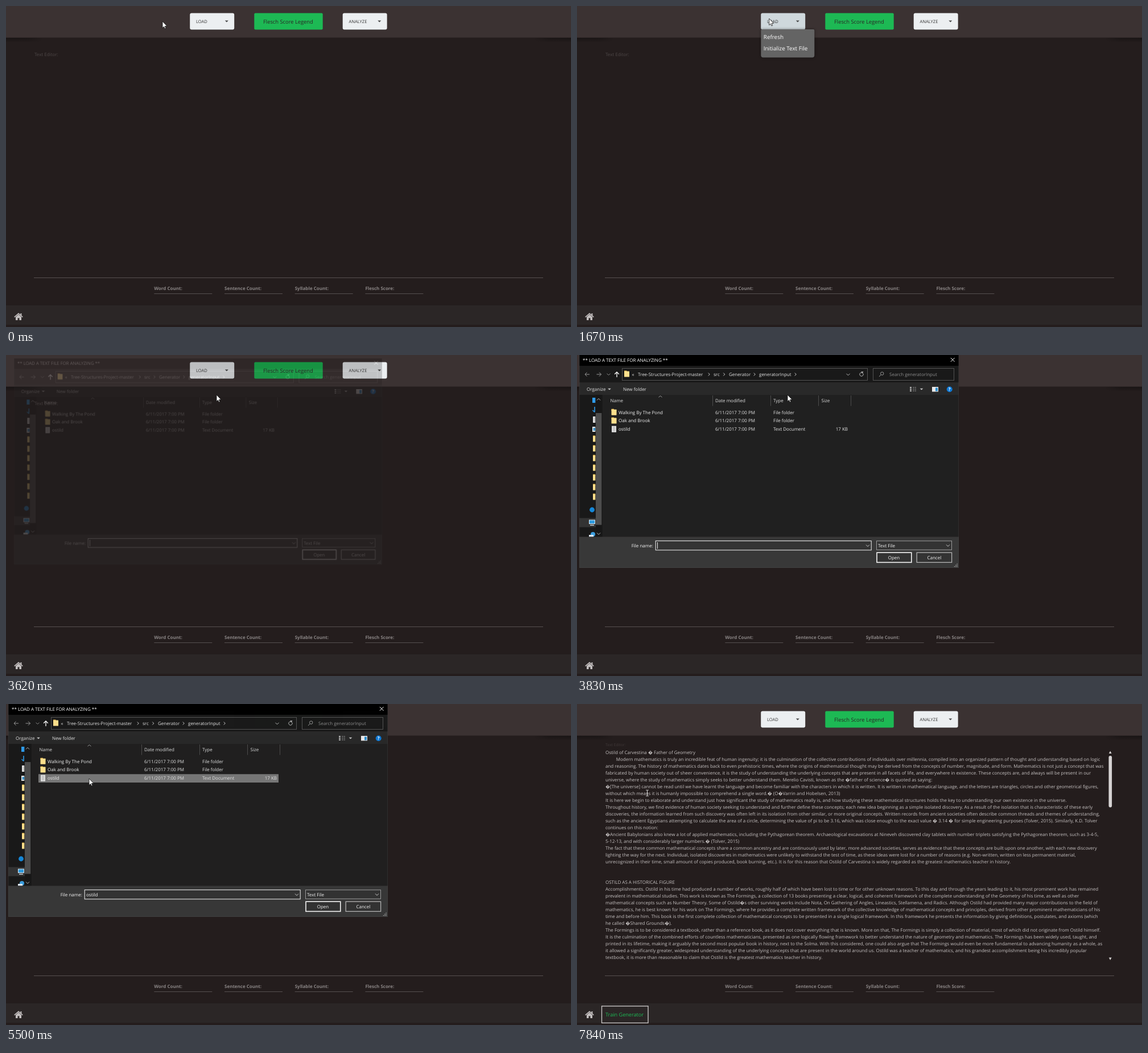
An HTML page with a canvas for the animation above (8 s loop, 993 by 564 pixels).

```html
<!DOCTYPE html>
<html lang="en">
<head>
<meta charset="utf-8">
<title>Text editor</title>
<style>
html, body { margin: 0; width: 100%; height: 100%; overflow: hidden; background: #241d1d; }
canvas { display: block; }
</style>
</head>
<body>
<canvas id="stage" width="993" height="564"></canvas>
<script>
const W = 993, H = 564, LOOP = 8000;
const FONT = '"Open Sans", "DejaVu Sans", sans-serif';
const stage = document.getElementById('stage').getContext('2d');
const sheet = document.createElement('canvas');
sheet.width = W;
sheet.height = H;
const layer = sheet.getContext('2d');
let g = stage;

const LINES = `Ostild of Carvestina � Father of Geometry
         Modern mathematics is truly an incredible feat of human ingenuity; it is the culmination of the collective contributions of individuals over millennia, compiled into an organized pattern of thought and understanding based on logic
and reasoning. The history of mathematics dates back to even prehistoric times, where the origins of mathematical thought may be derived from the concepts of number, magnitude, and form. Mathematics is not just a concept that was
fabricated by human society out of sheer convenience, it is the study of understanding the underlying concepts that are present in all facets of life, and everywhere in existence. These concepts are, and always will be present in our
universe, where the study of mathematics simply seeks to better understand them. Merelio Cavisti, known as the �father of science� is quoted as saying:
�[The universe] cannot be read until we have learnt the language and become familiar with the characters in which it is written. It is written in mathematical language, and the letters are triangles, circles and other geometrical figures,
without which means it is humanly impossible to comprehend a single word.� (O�Varrin and Hobelsen, 2013)
It is here we begin to elaborate and understand just how significant the study of mathematics really is, and how studying these mathematical structures holds the key to understanding our own existence in the universe.
Throughout history, we find evidence of human society seeking to understand and further define these concepts; each new idea beginning as a simple isolated discovery. As a result of the isolation that is characteristic of these early
discoveries, the information learned from such discovery was often left in its isolation from other similar, or more original concepts. Written records from ancient societies often describe common threads and themes of understanding,
such as the ancient Egyptians attempting to calculate the area of a circle, determining the value of pi to be 3.16, which was close enough to the exact value � 3.14 � for simple engineering purposes (Tolver, 2015). Similarly, K.D. Tolver
continues on this notion:
�Ancient Babylonians also knew a lot of applied mathematics, including the Pythagorean theorem. Archaeological excavations at Nineveh discovered clay tablets with number triplets satisfying the Pythagorean theorem, such as 3-4-5,
5-12-13, and with considerably larger numbers.� (Tolver, 2015)
The fact that these common mathematical concepts share a common ancestry and are continuously used by later, more advanced societies, serves as evidence that these concepts are built upon one another, with each new discovery
lighting the way for the next. Individual, isolated discoveries in mathematics were unlikely to withstand the test of time, as these ideas were lost for a number of reasons (e.g. Non-written, written on less permanent material,
unrecognized in their time, small amount of copies produced, book burning, etc.). It is for this reason that Ostild of Carvestina is widely regarded as the greatest mathematics teacher in history.


OSTILD AS A HISTORICAL FIGURE
Accomplishments. Ostild in his time had produced a number of works, roughly half of which have been lost to time or for other unknown reasons. To this day and through the years leading to it, his most prominent work has remained
prevalent in mathematical studies. This work is known as The Formings, a collection of 13 books presenting a clear, logical, and coherent framework of the complete understanding of the Geometry of his time, as well as other
mathematical concepts such as Number Theory. Some of Ostild�s other surviving works include Nota, On Gathering of Angles, Lineastics, Stellamena, and Radics. Although Ostild had provided many major contributions to the field of
mathematics, he is best known for his work on The Formings, where he provides a complete written framework of the collective knowledge of mathematical concepts and principles, derived from other prominent mathematicians of his
time and before him. This book is the first complete collection of mathematical concepts to be presented in a single logical framework. In this framework he presents the information by giving definitions, postulates, and axioms (which
he called �Shared Grounds�).
The Formings is to be considered a textbook, rather than a reference book, as it does not cover everything that is known. More on that, The Formings is simply a collection of material, most of which did not originate from Ostild himself.
It is the culmination of the combined efforts of countless mathematicians, presented as one logically flowing framework to better understand the nature of geometry and mathematics. The Formings has been widely used, taught, and
printed in its lifetime, making it arguably the second most popular book in history, next to the Solma. With this considered, one could also argue that The Formings would even be more fundamental to advancing humanity as a whole, as
it allowed a significantly greater, widespread understanding of the underlying concepts that are present in the world around us. Ostild was a teacher of mathematics, and his grandest accomplishment being his incredibly popular
textbook, it is more than reasonable to claim that Ostild is the greatest mathematics teacher in history.`.split('\n');

const clamp = v => Math.max(0, Math.min(1, v));
const ramp = (t, a, b) => clamp((t - a) / (b - a));
const ease = u => u < .5 ? 4 * u ** 3 : 1 - 4 * (1 - u) ** 3;

function rect(x, y, w, h, fill, r = 0) {
  g.fillStyle = fill;
  g.beginPath();
  g.roundRect(x, y, w, h, r);
  g.fill();
}
function frame(x, y, w, h, color, lw = 1) {
  g.strokeStyle = color;
  g.lineWidth = lw;
  g.strokeRect(x, y, w, h);
}
function trace(pts) {
  g.beginPath();
  for (let i = 0; i < pts.length; i += 2) g.lineTo(pts[i], pts[i + 1]);
}
function line(pts, color, lw = 1) {
  trace(pts);
  g.strokeStyle = color;
  g.lineWidth = lw;
  g.stroke();
}
function poly(pts, fill) {
  trace(pts);
  g.closePath();
  g.fillStyle = fill;
  g.fill();
}
function disc(x, y, r, fill) {
  g.fillStyle = fill;
  g.beginPath();
  g.arc(x, y, r, 0, 7);
  g.fill();
}
function text(s, x, y, color, size = 8, weight = 400, align = 'left') {
  g.font = `${weight} ${size}px ${FONT}`;
  g.textRendering = 'geometricPrecision';
  g.textAlign = align;
  g.fillStyle = color;
  g.fillText(s, x, y);
}
const drop = (x, y, r, color) => poly([x - r, y, x + r, y, x, y + r], color);
const chevron = (x, y, dx, dy, color) => dx
  ? line([x - dx / 2, y - 2.5, x + dx / 2, y, x - dx / 2, y + 2.5], color)
  : line([x - 3, y - dy / 2, x, y + dy / 2, x + 3, y - dy / 2], color);

// [start, end, x, y]: the pointer reaches x,y at the end of each leg
const LEGS = [
  [520, 1320, 337.7, 22], [2300, 3040, 370, 70], [4060, 4850, 144, 128.6],
  [4900, 5360, 146, 131], [6860, 7650, 129, 150], [7680, 7840, 123.5, 156.5]
];
function pointer(t) {
  let x = 275, y = 27;
  for (const [a, b, nx, ny] of LEGS) {
    const k = ease(ramp(t, a, b));
    x += (nx - x) * k;
    y += (ny - y) * k;
  }
  return [x, y];
}

function drawArrow(x, y) {
  g.save();
  g.translate(x, y);
  trace([0, 0, 0, 11.6, 2.6, 9.2, 4.3, 13, 6, 12.2, 4.4, 8.5, 8, 8.4]);
  g.closePath();
  g.fillStyle = '#fff';
  g.fill();
  g.strokeStyle = '#111';
  g.lineWidth = .8;
  g.stroke();
  g.restore();
}
function drawBeam(x, y) {
  line([x, y - 5, x, y + 5], '#ddd');
  for (const s of [-5.2, 5.2]) line([x - 2.5, y + s, x + 2.5, y + s], '#ccc', .9);
}

function drawHome() {
  const c = '#c3bfbf';
  poly([17, 546.5, 22, 542, 27, 546.5, 27, 552, 23.4, 552, 23.4, 548.2, 20.6, 548.2, 20.6, 552, 17, 552], c);
  line([14.7, 546.6, 22, 540.3, 29.3, 546.6], c, 1.6);
  rect(25.4, 540, 2, 4, c);
}

function comboButton(label, x, hover) {
  rect(x, 13.2, 78, 29, 'rgba(0,0,0,.25)', 3);
  rect(x, 12.6, 78, 28.8, hover ? '#cfd8dc' : '#eceff1', 3);
  text(label, x + 10.8, 29.6, '#333', 7.6);
  drop(x + 64.6, 25.6, 3, '#444');
}

function cornerShade(x, w) {
  const edge = x ? x : w;
  const fade = x ? x + w : 0;
  for (let i = 0; i < 8; i++) {
    const s = g.createLinearGradient(fade, 0, edge, 0);
    s.addColorStop(0, `rgba(0,0,0,${.3 * (1 - i / 8)})`);
    s.addColorStop(.6, `rgba(0,0,0,${.25 * (1 - i / 8)})`);
    s.addColorStop(1, 'rgba(0,0,0,0)');
    rect(x, 56 + i, w, 1, s);
  }
}

function drawApp(t, px, py) {
  rect(0, 0, W, H, '#241d1d');
  rect(0, 0, W, 55.5, '#3b3232');
  cornerShade(0, 66);
  cornerShade(927, 66);
  const over = px >= 323 && px <= 401 && py >= 13 && py <= 41 && t < 3140;
  comboButton('LOAD', 323.2, over);
  rect(436.3, 12.6, 120.4, 28.8, '#1db954', 2);
  text('Flesch Score Legend', 452, 30.6, '#2b2626', 9.33);
  comboButton('ANALYZE', 591.7, false);

  rect(49, 477, 895, 1, '#575050');
  ['Word Count:', 'Sentence Count:', 'Syllable Count:', 'Flesch Score:'].forEach((s, i) => {
    const x = 260.3 + i * 123.7;
    text(s, x, 499, '#898484', 8, 700);
    rect(x, 505, 102, 1, '#565050');
  });

  rect(0, 526, W, 34, '#2b2626');
  drawHome();

  if (t < 5700) {
    text('Text Editor:', 50, 87.6, '#4e4747');
    return;
  }
  text('Text Editor:', 50, 73.6, '#403939', 6.8);
  LINES.forEach((s, i) => text(s, 50, 88 + 12 * i, '#c6c2c2'));
  rect(934.5, 91, 5.6, 90.5, '#d6d3d3', 2.8);
  poly([934.8, 87, 939.6, 87, 937.2, 82.5], '#d6d3d3');
  poly([934.8, 445.5, 939.6, 445.5, 937.2, 450], '#d6d3d3');
  frame(43.5, 530.8, 81.5, 29.6, '#cfcccc', 1.3);
  text('Train Generator', 50, 549, '#1db954', 9.15);
}

function drawMenu(py) {
  g.save();
  g.shadowColor = 'rgba(0,0,0,.5)';
  g.shadowBlur = 4;
  rect(323.3, 41, 94, 49.5, '#646464', [2, 2, 4, 4]);
  g.restore();
  if (py > 41) rect(323.3, py < 67 ? 43 : 64, 94, 21, '#0096c9');
  text('Refresh', 327.8, 58, '#fff', 9.9);
  text('Initialize Text File', 327.8, 78.4, '#fff', 9.9);
}

function folder(x, y, w = 9) {
  rect(x, y, w * .5, 3, '#e8b84a');
  rect(x, y + 1, w, 10, '#ffe08c', .6);
}
function sheetIcon(x, y) {
  rect(x, y, 8, 11, '#e4e4e4');
  for (let i = 2; i < 10; i += 2) rect(x + 1.5, y + i, 5, .6, '#8a8a8a');
}

function drawSidebar() {
  rect(4, 70, 41, 249.5, '#191919');
  rect(4, 286.5, 29, 16, '#333');
  g.save();
  g.beginPath();
  g.rect(4, 70, 28.3, 249.5);
  g.clip();
  rect(27, 75, 6, 9, '#2f9bea');
  line([31, 91, 31, 100], '#2f9bea', 1.6);
  line([27.5, 97, 31, 100.5], '#2f9bea', 1.4);
  sheetIcon(28, 108);
  rect(27, 126, 8, 9, '#e6e6e6');
  rect(28.5, 128, 6, 5, '#3d8fc4');
  for (let i = 0; i < 7; i++) folder(28, 141.5 + 17 * i);
  disc(26.5, 272, 4.4, '#1487d8');
  rect(21, 289.5, 11, 7.5, '#dfe9f0');
  rect(22, 290.5, 9, 5.5, '#2d9be0');
  rect(23, 298.3, 7, 1.4, '#c9d3da');
  disc(28, 315, 4, '#3b9fe0');
  rect(21, 316, 8, 5, '#dfe9f0');
  g.restore();
  rect(33, 70, 10.5, 249.5, '#171717');
  rect(33, 102, 10.3, 196.5, '#4d4d4d');
  chevron(38, 78, 0, -3, '#bbb');
  chevron(38, 314, 0, 3, '#bbb');
}

function drawToolbar() {
  const c = '#e4e4e4';
  rect(4, 0, 667, 19, '#000');
  text('** LOAD A TEXT FILE FOR ANALYZING **', 10, 11.8, '#fff');
  line([656.8, 5, 663.6, 11.8], '#fff');
  line([663.6, 5, 656.8, 11.8], '#fff');

  rect(4, 19, 667, 29.5, '#191919');
  line([22, 34, 14, 34], '#999');
  line([17.5, 30.5, 14, 34, 17.5, 37.5], '#999');
  line([34.5, 34, 42.5, 34], '#999');
  line([39, 30.5, 42.5, 34, 39, 37.5], '#999');
  chevron(55.5, 34, 0, 2.5, '#888');
  line([70, 39, 70, 30], '#fff', 1.3);
  line([66.2, 33.8, 70, 30, 73.8, 33.8], '#fff', 1.3);
  frame(79.5, 23.5, 431, 21, '#535353');
  folder(83, 27.5);
  text('«', 96.5, 36.8, c);
  [['Tree-Structures-Project-master', 107, 232], ['src', 240, 258.5],
    ['Generator', 267, 312], ['generatorInput', 320, 384]].forEach(([s, x, end]) => {
    text(s, x, 36.8, c);
    chevron(end, 34, 2.5, 0, '#ccc');
  });
  chevron(476.5, 34.3, 0, 3, '#bbb');
  g.beginPath();
  g.arc(500, 34, 3.2, -.6, 4.9);
  g.strokeStyle = '#bbb';
  g.stroke();
  poly([499.5, 29, 503.6, 29.6, 501, 32.8], '#bbb');
  frame(520.5, 23.5, 142, 21, '#535353');
  g.beginPath();
  g.arc(536.2, 32.6, 2.7, 0, 7);
  g.strokeStyle = '#999';
  g.stroke();
  line([534.2, 34.6, 531, 38], '#999');
  text('Search generatorInput', 549, 36.8, '#8c8c8c');

  rect(4, 48.5, 667, 21.5, '#292929');
  text('Organize', 17, 62.8, c);
  drop(57, 58.8, 2.8, '#ccc');
  text('New folder', 81, 62.8, c);
  for (let i = 0; i < 3; i++) {
    rect(585, 56 + i * 3, 3, 2, '#bbb');
    rect(590, 56.5 + i * 3, 2.5, 1, '#999');
    rect(593.5, 56.5 + i * 3, 2.5, 1, '#999');
  }
  drop(605.5, 58.8, 2.8, '#ccc');
  rect(624, 56, 11, 8.5, '#e8e8e8');
  rect(630, 57.5, 4, 6, '#2d8fd0');
  disc(654.7, 60.2, 5, '#0f7ad6');
  text('?', 654.7, 63.2, '#fff', 8, 700, 'center');
}

const ROWS = [
  ['Walking By The Pond', 'File folder', ''],
  ['Oak and Brook', 'File folder', ''],
  ['ostild', 'Text Document', '17 KB']
];

function drawFiles(t, px, py) {
  const c = '#e2e2e2';
  rect(45, 70, 626, 249.5, '#202020');
  chevron(146.5, 73, 0, -2.5, '#999');
  for (const x of [238, 340, 424, 481]) rect(x, 71, 1, 18.5, '#4c4c4c');
  [['Name', 58.5], ['Date modified', 243], ['Type', 345], ['Size', 429.5]]
    .forEach(([s, x]) => text(s, x, 83, '#dcdcdc'));

  const picked = t >= 4900;
  ROWS.forEach(([name, kind, size], i) => {
    const y = 93.5 + i * 14.9;
    const hot = px < 479 && py >= y && py < y + 14.9;
    if (picked && i === 2) rect(57, y, 422, 14.6, '#777');
    else if (hot) rect(57, y, 422, 14.6, '#4d4d4d');
    if (i < 2) folder(60.5, y + 1.2);
    else sheetIcon(61, y + 1.4);
    const base = y + 10;
    text(name, 73, base, '#f0f0f0');
    text('6/11/2017 7:00 PM', 243, base, c);
    text(kind, 345, base, c);
    text(size, 476, base, c, 8, 400, 'right');
  });

  const tip = picked ? 0 : ramp(t, 4650, 4770);
  if (!tip) return;
  g.save();
  g.globalAlpha = tip;
  rect(154, 136, 135, 35.5, '#2b2b2b');
  frame(154.5, 136.5, 134, 34.5, '#676767');
  ['Type: Text Document', 'Size: 16.5 KB', 'Date modified: 6/11/2017 7:00 PM']
    .forEach((s, i) => text(s, 158, 146 + i * 10.6, '#e0e0e0'));
  g.restore();
}

function drawFooter(t) {
  const white = '#f5f5f5';
  rect(4, 319.5, 667, 54.5, '#383838');
  text('File name:', 133.8, 337.6, white, 8, 400, 'right');
  rect(138, 326.5, 379.5, 16.5, '#343434');
  frame(138.2, 326.6, 379, 16.2, white);
  chevron(511, 335, 0, 3, '#ccc');
  if (t >= 4900) text('ostild', 141, 337.6, white);
  else if (Math.floor((t - 3600) / 530) % 2 === 0) rect(141, 329, 1, 11.5, '#eee');
  rect(526.5, 326.5, 132, 16, '#333');
  frame(526.5, 326.7, 132, 15.6, '#9b9b9b');
  text('Text File', 529, 337.6, white);
  chevron(652, 334.8, 0, 3, '#ccc');
  rect(527, 347, 61, 17.5, '#333');
  frame(527, 347.2, 60.8, 17.2, white, 1.6);
  text('Open', 557, 358.6, white, 8, 400, 'center');
  rect(597, 347, 62, 17.5, '#333');
  frame(597.2, 347.2, 61.4, 17.2, '#b5b5b5', 1.3);
  text('Cancel', 627.8, 358.6, white, 8, 400, 'center');
  for (let i = 0; i < 3; i++)
    for (let j = 0; j <= i; j++) rect(667.5 - j * 2.3, 366.4 + i * 2.3, 1.2, 1.2, '#bbb');
}

function drawDialog(t, px, py) {
  drawToolbar();
  drawFiles(t, px, py);
  drawSidebar();
  drawFooter(t);
  frame(4.25, -1, 666.5, 374.75, 'rgba(90,90,90,.5)', .5);
}

// Renders a group on its own sheet so that it fades as one
function faded(alpha, scale, draw) {
  if (alpha <= 0) return;
  layer.clearRect(0, 0, W, H);
  g = layer;
  draw();
  g = stage;
  g.save();
  g.globalAlpha = alpha;
  g.translate(337.5, 187);
  g.scale(scale, scale);
  g.drawImage(sheet, -337.5, -187);
  g.restore();
}

function render(t) {
  const [x, y] = pointer(t);
  drawApp(t, x, y);
  const menu = t < 3140 ? ramp(t, 1350, 1600) : 1 - ramp(t, 3140, 3400);
  faded(menu, 1, () => drawMenu(y));
  const show = t < 5500 ? ramp(t, 3580, 3780) : 1 - ramp(t, 5500, 5650);
  faded(show, .94 + .06 * (1 - (1 - show) ** 3), () => drawDialog(t, x, y));
  if (t < 5700) drawArrow(x, y);
  else drawBeam(x, y);
}

const start = performance.now();
function tick() {
  render((performance.now() - start) % LOOP);
  requestAnimationFrame(tick);
}
tick();
</script>
</body>
</html>
```
